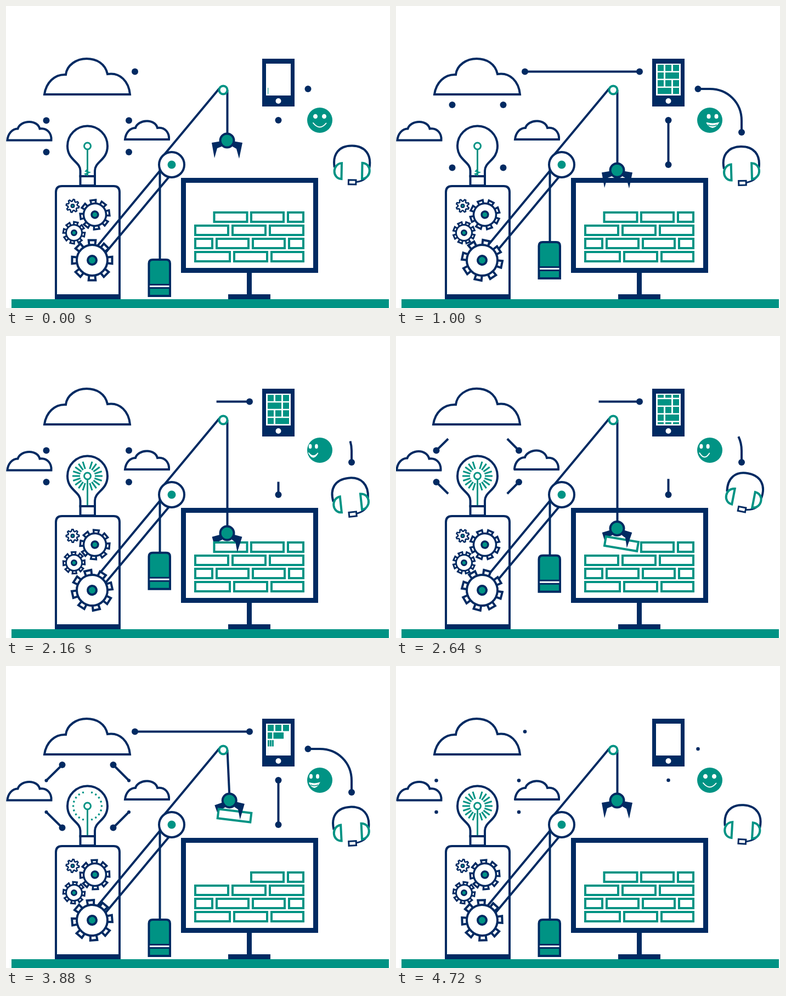
Write an HTML page that moves like this. It is 700 px wide and 550 px high and loops after 4760 ms.

```html
<!DOCTYPE html>
<html lang="en">
<head>
<meta charset="utf-8">
<title>Workshop</title>
<style>
  html, body { margin: 0; width: 100%; height: 100%; overflow: hidden; background: #fff; }
  svg { display: block; width: 700px; height: 550px; }
  .n { fill: #002a62; }
  .t { fill: #009384; }
  .w { fill: #fff; }
  .ns { stroke: #002a62; stroke-width: 4; fill: none; }
  .ts { stroke: #009384; stroke-width: 4; fill: none; }
  .nw { stroke: #002a62; stroke-width: 4; fill: #fff; }
  .nt { stroke: #002a62; stroke-width: 4; fill: #009384; }
  .tw { stroke: #009384; stroke-width: 4; fill: #fff; }
</style>
</head>
<body>
<svg viewBox="0 0 700 550">
  <defs>
    <clipPath id="faceClip"><circle cx="572" cy="208" r="23"/></clipPath>
    <clipPath id="screenClip"><rect x="474" y="107" width="45" height="53.5"/></clipPath>
  </defs>

  <rect class="t" x="10" y="534" width="688" height="16"/>

  <path id="cloud" class="nw"/>
  <path id="cloudL" class="nw"/>
  <path id="cloudR" class="nw"/>
  <g id="links"></g>

  <!-- bulb and machine -->
  <path class="nw" d="M135.500 310V300C135.500 283 112 281 112 255A36.500 36.500 0 0 1 185 255C185 281 162 283 162 300V310Z"/>
  <rect class="nw" x="135.500" y="310" width="26.500" height="17"/>
  <g id="rays" class="ts" style="stroke-width:3"></g>
  <path class="ts" style="stroke-width:3" d="M148.500 261V308"/>
  <path id="spark" class="ts" style="stroke-width:2" d="M148.500 297L145 301L152 303L144 306L149 309"/>
  <circle class="tw" style="stroke-width:3" cx="148.500" cy="255" r="6"/>
  <path class="nw" d="M91 532V339Q91 328 102 328H196Q207 328 207 339V532Z"/>
  <rect class="n" x="89" y="525" width="120" height="9"/>

  <!-- monitor -->
  <rect class="n" x="319" y="313" width="250" height="173"/>
  <rect class="w" x="328" y="322" width="232" height="155"/>
  <rect class="n" x="439" y="486" width="9" height="40"/>
  <rect class="n" x="405" y="525" width="77" height="9"/>
  <g id="wall" class="ts"></g>

  <!-- crane -->
  <path class="ns" d="M389 150L284 276M284 296L160 445M299 309L175 457"/>
  <g id="gears"></g>
  <path id="cord" class="ns"/>
  <circle class="nw" cx="302" cy="289" r="23"/>
  <circle class="t" cx="302" cy="289" r="7.500"/>
  <g id="weight">
    <path class="nt" d="M260.500 528V469Q260.500 462 267.500 462H292Q299 462 299 469V528Z"/>
    <rect class="nw" style="stroke-width:3" x="260.500" y="507.500" width="38.500" height="6"/>
  </g>
  <g id="hook">
    <path id="rope" class="ns"/>
    <g id="prongL"><path class="n" d="M-28 4L-10 1L-10 11L-18 14L-23 32Z"/></g>
    <rect id="brick" class="tw" x="-30" y="-8.500" width="60" height="17"/>
    <g id="prongR"><path class="n" d="M28 4L10 1L10 11L17 15L22 33Z"/></g>
    <circle id="hub" class="nt" cx="403" r="12.500"/>
  </g>
  <circle class="tw" cx="396" cy="153" r="7.500"/>

  <!-- phone -->
  <rect class="n" x="467" y="96" width="59" height="87"/>
  <rect class="w" x="474" y="105" width="45" height="58"/>
  <circle class="w" cx="496.500" cy="173" r="5"/>
  <g id="cells" class="t" clip-path="url(#screenClip)"></g>

  <!-- face -->
  <circle class="t" cx="572" cy="208" r="23"/>
  <g id="face" clip-path="url(#faceClip)"></g>

  <!-- headset -->
  <g id="headset">
    <path class="ns" d="M598.500 295C594 271 606 255 630 255C654 255 666 271 662 295"/>
    <path class="ns" style="stroke-width:3" d="M662 300Q660 318 638 321"/>
    <path class="tw" d="M611.500 287V316C594 315 594 289 611.500 287Z"/>
    <path class="tw" d="M649 286V315C667 313 667 287 649 286Z"/>
    <rect class="nw" style="stroke-width:3" x="624.500" y="317.500" width="13.500" height="8"/>
  </g>
</svg>
<script>
const LOOP = 4760, HALF = LOOP / 2, BEAT = LOOP / 5;
const $ = id => document.getElementById(id);
const ramp = (t, a, b) => Math.min(1, Math.max(0, (t - a) / (b - a)));
const ease = x => (1 - Math.cos(Math.PI * x)) / 2;
const sweep = (t, a, b) => ease(ramp(t, a, b));
const pulse = (t, a, b, c, d) => ramp(t, a, b) - ramp(t, c, d);
const bump = (p, mid, w) => Math.abs(p - mid) < w ? Math.cos((p - mid) / w * Math.PI / 2) ** 2 : 0;

function add(parent, tag, attrs) {
  const el = document.createElementNS('http://www.w3.org/2000/svg', tag);
  for (const k in attrs) el.setAttribute(k, attrs[k]);
  return parent.appendChild(el);
}
const put = (el, k, v) => el.setAttribute(k, v);

function track(t, keys) {
  let i = 1;
  while (i < keys.length - 1 && t > keys[i][0]) i++;
  const [a, from] = keys[i - 1], [b, to] = keys[i];
  return from + (to - from) * ramp(t, a, b);
}

// Wall: each row holds the outer left and right edges of its bricks
[
  [374, [445, 508], [512, 544]],
  [398, [343, 407], [411, 475], [479, 544]],
  [422, [343, 378], [382, 444], [448, 510], [514, 544]],
  [446, [343, 410], [414, 478], [482, 544]]
].forEach(([y, ...row]) => row.forEach(([a, b]) =>
  add($('wall'), 'rect', { x: a + 2, y: y + 2, width: b - a - 4, height: 17 })));

// Gears
function makeGear(x, y, body, outer, hub, width, start, turn) {
  const g = add($('gears'), 'g', { transform: `translate(${x} ${y})` });
  const wheel = add(g, 'g', {});
  const half = body * 0.19;
  for (let i = 0; i < 8; i++) {
    add(wheel, 'path', {
      class: 'nw', style: `stroke-width:${width}`, transform: `rotate(${i * 45})`,
      d: `M${-half} ${-body + 1}L${-half - 1} ${-outer}H${half + 1}L${half} ${-body + 1}`
    });
  }
  add(wheel, 'circle', { class: 'nw', style: `stroke-width:${width}`, r: body });
  add(wheel, 'circle', { class: 'nt', style: `stroke-width:${width}`, r: hub });
  return { wheel, start, turn };
}
const gears = [
  makeGear(124, 413, 14.5, 19.5, 4.5, 3, 10, 270),
  makeGear(162, 380, 20.5, 26.5, 6, 3.5, -7, -270),
  makeGear(157, 463, 28, 36.5, 8, 4, 0, 270)
];

function cogPath(r, R, n) {
  let d = '';
  for (let i = 0; i < n * 4; i++) {
    const a = (i + 0.5) / (n * 4) * 2 * Math.PI, q = i % 4 < 2 ? R : r;
    d += `${i ? 'L' : 'M'}${(q * Math.cos(a)).toFixed(2)} ${(q * Math.sin(a)).toFixed(2)}`;
  }
  return d + 'Z';
}
const cogBox = add($('gears'), 'g', { transform: 'translate(121.5 364)' });
const cog = add(cogBox, 'path', { class: 'nw', style: 'stroke-width:2.5', d: cogPath(8.5, 11.8, 8) });
add(cogBox, 'circle', { class: 'nt', style: 'stroke-width:2', r: 3 });

// Bulb rays, with a gap at the stem
const rays = [];
for (let i = 1; i < 20; i++) {
  rays.push(add($('rays'), 'path', { transform: `translate(148.5 255) rotate(${i * 18})` }));
}

// Links: a line with a dot at either end
function makeLink(d, a, b) {
  const line = add($('links'), 'path', { class: 'ns', d, pathLength: 100 });
  const dot = ([cx, cy]) => add($('links'), 'circle', { class: 'n', cx, cy });
  return { line, a: dot(a), b: dot(b) };
}
const straight = (a, b) => makeLink(`M${a}L${b}`, a, b);
const longLinks = [
  straight([235, 119.5], [444, 119.5]),
  straight([496.5, 208], [496.5, 289]),
  makeLink('M550.5 151H572C605 151 630 176 630 209V230', [550.5, 151], [630, 230])
];
const cloudLinks = [
  straight([73.5, 208.5], [102.5, 180]),
  straight([224, 208.5], [195.5, 180]),
  straight([73.5, 266], [102.5, 294.5]),
  straight([224, 266], [195.5, 294.5])
];
function drawLink(link, from, to, ra, rb) {
  const len = (to - from) * 100;
  put(link.line, 'visibility', len > 0.5 ? 'visible' : 'hidden');
  put(link.line, 'stroke-dasharray', `0 ${from * 100} ${len} 200`);
  put(link.a, 'r', 6 * ra);
  put(link.b, 'r', 6 * rb);
}

// Phone rows: cell spans measured in thirds of the screen
const layouts = [[1, 1, 1], [1, 2], [1, 1, 1], [2, 1]];
const rows = [];
for (let i = 0; i < 8; i++) {
  const g = add($('cells'), 'g', {});
  let x = 0;
  for (const n of layouts[i % 4]) {
    add(g, 'rect', { x, y: 0, width: n * 14 - 3, height: 11.5 });
    x += n * 14;
  }
  rows.push(g);
}

// Face copies slide across the ball
const faces = [0, 1, 2].map(() => {
  const g = add($('face'), 'g', {});
  const eyes = [-8, 8].map(cx => add(g, 'ellipse', { class: 'w', cx, cy: -7, rx: 4, ry: 4.3 }));
  const mouth = add(g, 'path', { stroke: '#fff', 'stroke-width': 2, 'stroke-linecap': 'round' });
  const lip = add(g, 'path', { class: 'ts', style: 'stroke-width:1.5', d: 'M-9 8.500Q0 12 9 8.500' });
  return { g, eyes, mouth, lip };
});

function drawClouds(t) {
  const p = t % BEAT, up = 12 * bump(p, 515, 250), out = 2 * bump(p, 730, 160);
  const top = 96 - up, l = 70 - out;
  put($('cloud'), 'd', `M${l} 161H226C224 138 208 120 185 124C181 ${105 - up * 0.6} 165 ${top} 147 ${top}` +
    `C129 ${top} 111 ${107 - up * 0.5} 109 125C${88 - out} 124 ${73 - out} 140 ${l} 161Z`);
  const s = bump(p, 615, 330);
  const small = (x, y) => `M${x - s} ${y}h${80 - s * 0.5}c1 -12 -7 -23 -21 -21c-2 -8 -10 -${12.5 + s * 1.5} -19 -${12.5 + s * 1.5}` +
    `c-10 0 -19 ${5 + s * 1.5} -21 12.5c-10 0 -18 9 -19 21Z`;
  put($('cloudL'), 'd', small(2.5, 244.5));
  put($('cloudR'), 'd', small(217, 243));
}

function drawLinks(t) {
  const u = t < HALF ? t : LOOP - t;
  const first = pulse(u, -2, -1, 1560, 1640);
  const blink = t > 4560 ? 1 - ramp(t, 4560, 4640) + ramp(t, 4680, 4755) : 1;
  for (const l of longLinks)
    drawLink(l, ramp(u, 1720, 2340), ramp(u, 220, 700), first * blink, ramp(u, 700, 780));

  const p = t % HALF;
  const from = ramp(p, 520, 900) - ramp(p, 1080, 1440);
  const to = ramp(p, 60, 330) - ramp(p, 1790, 2150);
  const near = 1 - ramp(p, 450, 520) + ramp(p, 1460, 1540) - ramp(p, 2200, 2280) + ramp(p, 2300, 2375);
  const far = pulse(p, 330, 400, 1720, 1790);
  for (const l of cloudLinks) drawLink(l, from, to, near, far);
}

function drawBulb(t) {
  const size = 14 * (pulse(t, 1440, 1640, 2900, 3100) + ramp(t, 3840, 4020));
  $('rays').style.display = size ? '' : 'none';
  for (const r of rays) put(r, 'd', `M0 -27.500V${-27.5 + size}`);
  put($('spark'), 'visibility', t < 1300 ? 'visible' : 'hidden');
}

function drawCrane(t) {
  const y = 245 + 114 * sweep(t, 400, 1640) - 121 * sweep(t, 2530, 3180) + 7 * sweep(t, 3180, 3360);
  const sway = t > 3380 && t < 4080 ? 2.7 * Math.sin((t - 3380) / 700 * 2 * Math.PI) : 0;
  const grip = sweep(t, 1800, 2300) - sweep(t, 4080, 4200);
  const hold = sweep(t, 2470, 2620);
  const drop = ramp(t, 4140, 4440) ** 2;

  put($('hook'), 'transform', `rotate(${sway} 403 153)`);
  put($('rope'), 'd', `M403.500 153V${y}`);
  put($('hub'), 'cy', y);
  put($('prongL'), 'transform', `translate(403 ${y}) rotate(${-7 * grip})`);
  put($('prongR'), 'transform', `translate(403 ${y}) rotate(${7 * grip})`);

  const k = hold * (1 - drop);
  const bx = 409.5 + 1.5 * k, by = 384.5 + (y + 28 - 384.5) * k;
  put($('brick'), 'transform', `translate(${bx} ${by}) rotate(${9.5 * k})`);

  const lift = -0.59 * (y - 245);
  put($('weight'), 'transform', `translate(0 ${lift})`);
  put($('cord'), 'd', `M280.500 292V${462 + lift}`);

  for (const g of gears) put(g.wheel, 'transform', `rotate(${g.start + g.turn * t / LOOP})`);
  put(cog, 'transform', `rotate(${270 * t / LOOP})`);
}

function drawPhone(t) {
  const step = (t - 1000) / 590, n = Math.min(4, Math.max(0, Math.floor(step)));
  const scroll = n < 4 && step > 0 ? n + sweep(step - n, 0.6, 1) : n;
  rows.forEach((row, i) => {
    const slot = i % 4, late = (3 - slot) * 130;
    const grow = sweep(t, late - 40, late + 320);
    const shrink = sweep(t, 3480 + late, 3900 + late);
    const s = grow - shrink;
    row.style.display = s > 0.005 && (i < 4 || scroll > 0) ? '' : 'none';
    put(row, 'transform', `translate(477 ${107 + 14 * (i - scroll)}) scale(${s} 1)`);
  });
}

function drawFace(t) {
  const x = track(t, [[0, 0], [500, 0], [1000, 5], [1680, 26], [2640, 30.5], [3360, 46], [3880, 70], [4500, 80], [LOOP, 80]]) % 40;
  const open = track(t, [[0, 0], [500, 0], [1000, 1], [1680, 0.7], [2640, 0], [3360, 1], [3880, 1], [4400, 0], [LOOP, 0]]);
  faces.forEach((f, i) => {
    const d = x + (i - 1) * 40, k = Math.max(0.4, 1 - Math.abs(d) / 40);
    put(f.g, 'transform', `translate(${572 + d} 208) scale(${k} 1)`);
    put(f.mouth, 'd', `M-12 5Q0 ${20 + open} 12 5Q0 ${20 - 12 * open} -12 5`);
    put(f.mouth, 'fill', open > 0.05 ? '#fff' : 'none');
    put(f.lip, 'visibility', open > 0.5 ? 'visible' : 'hidden');
  });
}

function drawHeadset(t) {
  const a = 2.5 + 9 * Math.cos((t - 690) / BEAT * 2 * Math.PI);
  put($('headset'), 'transform', `rotate(${a} 661 315)`);
}

const began = performance.now();
function frame() {
  const t = (performance.now() - began) % LOOP;
  for (const draw of [drawClouds, drawLinks, drawBulb, drawCrane, drawPhone, drawFace, drawHeadset]) draw(t);
  requestAnimationFrame(frame);
}
frame();
</script>
</body>
</html>
```
